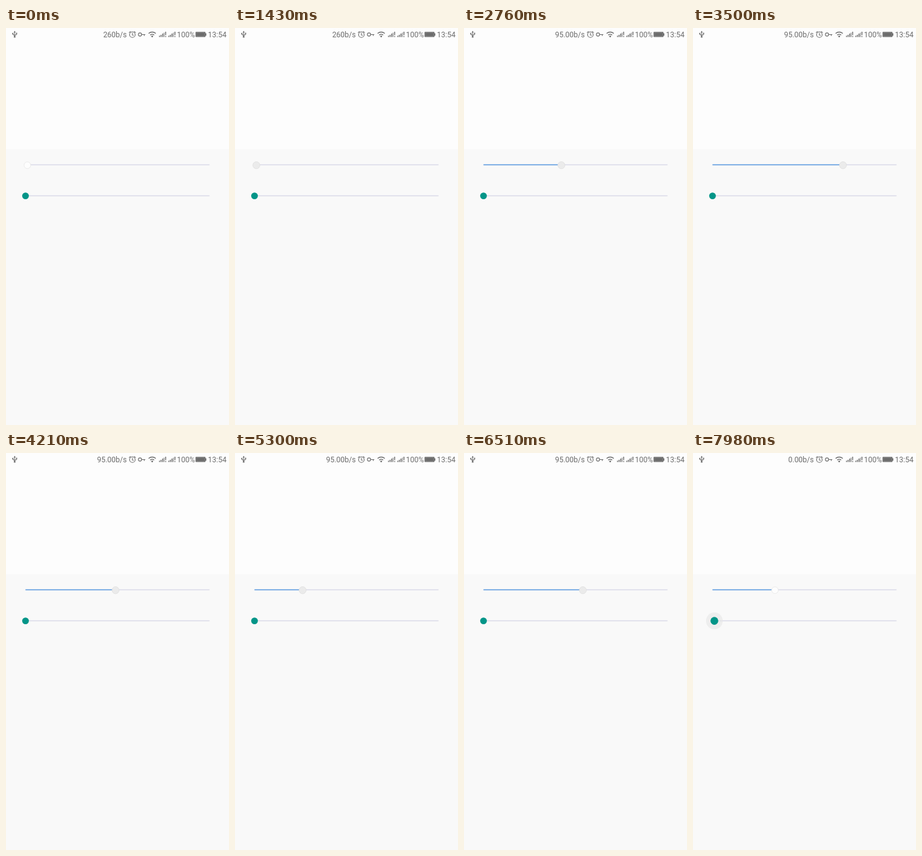
Write an HTML page that moves like this. It is 360 px wide and 640 px high and loops after 8 s.

```html
<!DOCTYPE html>
<html lang="en">
<head>
<meta charset="utf-8">
<title>Sliders</title>
<style>
  html, body { margin: 0; width: 100%; height: 100%; overflow: hidden; background: #f9f9f9; }
  svg { display: block; width: 100%; height: 100%; }
  text { font: 12px Roboto, sans-serif; }
</style>
</head>
<body>
<svg viewBox="0 0 360 640">
  <defs>
    <g id="signal">
      <path d="M0 14.5v-2h1.5v2zM2.6 14.5v-3.6h1.5v3.6zM5.2 14.5v-5.4h1.5v5.4zM7.7 14.5v-7h1v7z"/>
      <path d="M10 6h1.4v5.6h-1.4zM10 13h1.4v1.5h-1.4z"/>
    </g>
  </defs>
  <rect width="360" height="640" fill="#f9f9f9"/>
  <rect width="360" height="195.5" fill="#fdfdfd"/>

  <g fill="#6c6c6c">
    <text id="speed" x="195" y="14.6" text-anchor="end"></text>
    <text x="276" y="14.6">100%</text>
    <text x="326" y="14.6">13:54</text>
    <use href="#signal" x="247"/>
    <use href="#signal" x="262"/>
    <rect x="306" y="6.2" width="16" height="8.4" rx="1"/>
    <rect x="322" y="8.5" width="1.4" height="4"/>
    <rect x="307.5" y="7.7" width="13" height="5.4" fill="none" stroke="#8c8c8c" stroke-width=".6"/>
    <circle cx="14" cy="14.2" r="1.4"/>
    <path d="M12.4 7.2L14 4.6l1.6 2.6z"/>
    <circle cx="11" cy="8.8" r="1"/>
    <rect x="16.2" y="7.7" width="1.9" height="1.9"/>
    <circle cx="236" cy="13.6" r="1.4"/>
  </g>
  <g fill="none" stroke="#6c6c6c" stroke-width="1.1">
    <path d="M14 6.5v7M11 9v1.3l3 2M17.1 9.5v1l-3 1.6"/>
    <circle cx="204" cy="10.8" r="4.5"/>
    <path d="M204 8v3l2 1.3M198.6 7.6l2.6-2.1M209.4 7.6l-2.6-2.1"/>
    <circle cx="216.3" cy="10.5" r="2.6"/>
    <path d="M219 10.5h5.8M223.2 10.5v2.3"/>
    <path d="M230.2 8.8q5.8-4.6 11.6 0M232.8 11.4q3.2-2.5 6.4 0" stroke-width="1.4"/>
  </g>

  <g stroke="#d9d9e8" stroke-width="1.5">
    <path d="M31.5 220.5H328.5"/>
    <path d="M31.5 270.5H328.5"/>
  </g>
  <path id="fill" stroke="#5b9be0" stroke-width="1.7"/>
  <circle id="thumb" cy="221.2"/>

  <circle id="halo" cy="270.6" fill="#e6e6e6"/>
  <circle id="tealThumb" cy="270.6" fill="#039588"/>
</svg>
<script>
const LOOP = 8000;
const PRESS = 1430, RELEASE = 7070, TEAL_PRESS = 7560;

// Drag path of the upper thumb: [time, x]
const drag = [
  [1430, 34.5], [2000, 85], [2250, 102], [3080, 195], [3500, 242], [3720, 266],
  [3950, 242], [4210, 177], [4790, 100], [5000, 81], [5300, 109], [5630, 174],
  [6080, 251], [6470, 205], [6510, 192], [7070, 132.3]
];

const el = id => document.getElementById(id);
const set = (id, attrs) => {
  for (const key in attrs) el(id).setAttribute(key, attrs[key]);
};
const clamp = v => Math.min(1, Math.max(0, v));
const slope = (a, b) => (b[1] - a[1]) / (b[0] - a[0]);

// Tangent that vanishes at turning points, so the path never overshoots.
function tangent(i) {
  if (i === 0 || i === drag.length - 1) return 0;
  const before = slope(drag[i - 1], drag[i]);
  const after = slope(drag[i], drag[i + 1]);
  return before * after <= 0 ? 0 : 2 * before * after / (before + after);
}

function dragX(t) {
  if (t <= drag[0][0]) return drag[0][1];
  const next = drag.findIndex(p => p[0] > t);
  if (next < 0) return drag[drag.length - 1][1];
  const [t0, x0] = drag[next - 1], [t1, x1] = drag[next];
  const span = t1 - t0, u = (t - t0) / span, v = 1 - u;
  return x0 * v * v * (1 + 2 * u) + x1 * u * u * (3 - 2 * u)
    + span * u * v * (tangent(next - 1) * v - tangent(next) * u);
}

function render(t) {
  const x = dragX(t);
  const pressed = t >= PRESS && t < RELEASE;
  el('speed').textContent = (t < 1720 ? '260' : t < 6900 ? '95.00' : '0.00') + 'b/s';
  set('fill', { d: `M31.5 220.5H${x}` });
  set('thumb', {
    cx: x,
    r: pressed ? 5.7 : 5.4,
    fill: pressed ? '#ebebeb' : '#fdfdfd',
    stroke: pressed ? '#dfdfdf' : '#e6e6e6',
    'stroke-width': 0.8
  });

  const grow = 1 - (1 - clamp((t - TEAL_PRESS) / 400)) ** 2;
  const tealX = 31.5 + 3 * grow;
  set('halo', { cx: tealX, r: 13.5 * grow, opacity: 0.6 * grow });
  set('tealThumb', { cx: tealX, r: 5.4 + 0.9 * grow });
}

const start = performance.now();
function tick() {
  render((performance.now() - start) % LOOP);
  requestAnimationFrame(tick);
}
tick();
</script>
</body>
</html>
```
